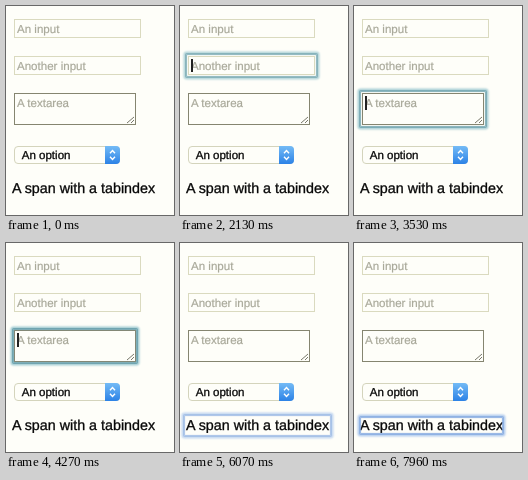
Recreate the animation shown at these times as an HTML page. Size 168 by 209 pixels, loop 8000 ms.

```html
<!DOCTYPE html>
<html lang="en">
<head>
<meta charset="utf-8">
<title>Focus rings</title>
<style>
  html, body { margin: 0; width: 100%; height: 100%; overflow: hidden; background: #fefef9; }
  #stage { position: relative; width: 168px; height: 209px; overflow: hidden; }
  svg { position: absolute; left: 0; top: 0; }
  text {
    font: 11.55px "Liberation Sans", Arial, sans-serif;
    text-rendering: geometricPrecision;
    fill: #a9a99a; stroke: #a9a99a; stroke-width: .2px;
  }
  text.dark { fill: #080808; stroke: #080808; stroke-width: .3px; }
  text.span { font-size: 14.3px; }
  .ring, .caret { position: absolute; opacity: 0; }
  .ring {
    border-radius: 1px;
    box-shadow: 0 0 0 1px var(--edge), 0 0 2px 2.5px var(--glow), inset 0 0 1px 1px var(--edge);
  }
  .caret { background: #222; }
</style>
</head>
<body>
<div id="stage">
  <svg width="168" height="209" viewBox="0 0 168 209">
    <defs>
      <linearGradient id="blue" x2="0" y2="1">
        <stop stop-color="#74bbf6"/>
        <stop offset="1" stop-color="#2c82e6"/>
      </linearGradient>
    </defs>
    <g fill="none" stroke="#dadabf">
      <rect x="8.5" y="13.5" width="126" height="18"/>
      <rect x="8.5" y="50.5" width="126" height="18"/>
      <rect x="8.5" y="87.5" width="121" height="31" stroke="#858570"/>
      <rect x="8.5" y="140.5" width="105" height="17" rx="3.5" stroke="#d4d4bc"/>
    </g>
    <path d="M121 117l7-6M125 117l3-3" stroke="#77776a" fill="none"/>
    <path d="M99 140h11a4 4 0 0 1 4 4v10a4 4 0 0 1-4 4H99z" fill="url(#blue)"/>
    <path d="M104 147.2l2.5-2.7 2.5 2.7M104 150.8l2.5 2.7 2.5-2.7" stroke="#fff" stroke-width="1.4" fill="none"/>
    <text x="11" y="27">An input</text>
    <text x="11" y="64">Another input</text>
    <text x="11" y="101">A textarea</text>
    <text x="15.7" y="153" class="dark">An option</text>
    <text x="6" y="187" class="dark span">A span with a tabindex</text>
  </svg>
</div>
<script>
const LOOP = 8000, SETTLE = 600, SPREAD = 6;
const TEAL = ['#70a5b0', '#a4cdd4'], BLUE = ['#7fa6df', '#a9c6ee'];
const stage = document.getElementById('stage');

// box: x, y, width, height; caret: top and height
const fields = [
  { box: [7, 12, 129, 21], from: 610, to: 1945, caret: [15, 14] },
  { box: [7, 49, 129, 21], from: 1945, to: 3280, caret: [53, 13] },
  { box: [7, 86, 124, 34], from: 3280, to: 4615, caret: [90, 14] },
  { box: [7, 139, 108, 20], from: 4615, to: 5950 },
  { box: [6, 174, 143, 17], from: 5950, to: LOOP, tone: BLUE }
];

function place(style, [x, y, w, h]) {
  return Object.assign(style, {
    left: x + 'px', top: y + 'px', width: w + 'px', height: h + 'px'
  });
}

function add(className, box) {
  const el = document.createElement('div');
  el.className = className;
  place(el.style, box);
  stage.append(el);
  return el;
}

const grow = ([x, y, w, h], d) => [x - d, y - d, w + 2 * d, h + 2 * d];
const key = (time, opacity, more) => ({ offset: time / LOOP, opacity, ...more });
const play = (el, keys) => el.animate(keys, { duration: LOOP, iterations: Infinity });

for (const { box, from, to, caret, tone = TEAL } of fields) {
  const wide = place({}, grow(box, SPREAD));
  const tight = place({}, box);
  const last = to === LOOP;
  const ring = add('ring', box);
  ring.style.setProperty('--edge', tone[0]);
  ring.style.setProperty('--glow', tone[1]);
  play(ring, [
    key(0, 0, wide),
    key(from, 0, { ...wide, easing: 'cubic-bezier(.16,.84,.3,1)' }),
    key(from + SETTLE, 1, tight),
    key(last ? 7640 : to, 1, tight),
    ...(last ? [key(LOOP, .85, tight)] : [key(to, 0, tight), key(LOOP, 0, tight)])
  ]);

  if (!caret) continue;
  const steps = [[0, 0], [from, 1], [from + 500, 0], [from + 900, 1], [to, 0], [LOOP, 0]];
  play(add('caret', [11, caret[0], 1.5, caret[1]]),
    steps.map(([time, on]) => key(time, on, { easing: 'step-end' })));
}
</script>
</body>
</html>
```
